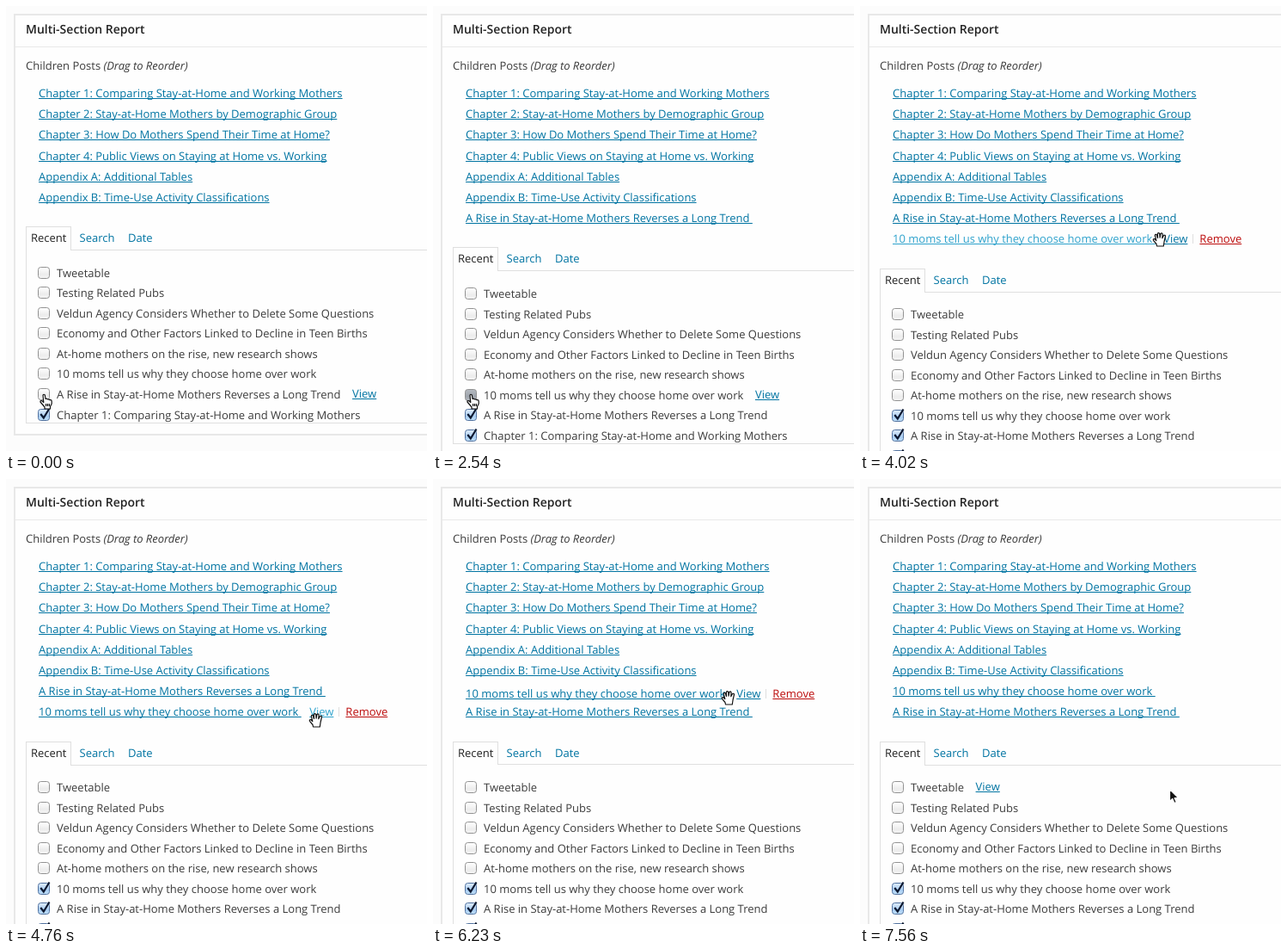
Recreate the animation shown at these times as an HTML page with a canvas. Size 490x517 px, loop 8000 ms.

```html
<!DOCTYPE html>
<html lang="en">
<head>
<meta charset="utf-8">
<style>
  html, body { margin: 0; width: 100%; height: 100%; overflow: hidden; background: #fcfcfc; }
  canvas { display: block; }
</style>
</head>
<body>
<canvas id="stage" width="490" height="517"></canvas>
<script>
const ctx = document.getElementById('stage').getContext('2d');
const LOOP = 8000;
const INK = '#3c3c3c', LINK = '#0074a2', HOVER = '#2ea2cc', RED = '#bc0b0b', LINE = '#dfdfdf';

const chapters = [
  'Chapter 1: Comparing Stay-at-Home and Working Mothers',
  'Chapter 2: Stay-at-Home Mothers by Demographic Group',
  'Chapter 3: How Do Mothers Spend Their Time at Home?',
  'Chapter 4: Public Views on Staying at Home vs. Working',
  'Appendix A: Additional Tables',
  'Appendix B: Time-Use Activity Classifications'
];
const RISE = 'A Rise in Stay-at-Home Mothers Reverses a Long Trend';
const MOMS = '10 moms tell us why they choose home over work';
const recent = [
  'Tweetable',
  'Testing Related Pubs',
  'Veldun Agency Considers Whether to Delete Some Questions',
  'Economy and Other Factors Linked to Decline in Teen Births',
  'At-home mothers on the rise, new research shows',
  MOMS, RISE, chapters[0]
];

// Cursor shapes with their offset from the pointer position
const cursors = {
  point: { dx: -7, dy: -1.5, fill: '#fff', edge: '#111',
    body: 'M4 1.5Q5 0 6.3 1.5L7 6Q8.5 5 9.3 6.5Q11 5.8 11.8 7.2Q14 6.6 14.2 9V11.5L12.5 15V17.5H6V15.5L1 9.5Q.5 7.5 3 8.3L4.8 10Z',
    detail: 'M7.6 11.5v3M9.5 11.5v3M11.4 11.5v3' },
  open: { dx: -8.5, dy: -8.5, fill: '#fff', edge: '#111',
    body: 'M5 16.5L4.5 14L1 9.8Q.3 8 2.2 8L4.3 10L2.8 4.2Q2.8 2.3 4.6 3L6 7L5.9 2Q6.8 .2 8.2 1.8L8.6 6.6L9.4 2Q10.8 .6 11.6 2.3L11.3 7.2L13 4Q14.8 3.2 15 5L13.6 11L12.8 16.5Z' },
  arrow: { dx: 0, dy: 0, fill: '#111', edge: '#fff',
    body: 'M0 0V14L3.2 11L5.4 16L7.8 15L5.6 10.2H10Z' }
};
for (const c of Object.values(cursors)) {
  c.body = new Path2D(c.body);
  c.detail = new Path2D(c.detail);
}

// Pointer track: time, shape, x, y (held until the next entry)
const track = [
  [0, 'point', 46, 452], [3580, 'arrow', 105, 445], [3730, 'arrow', 230, 380],
  [3880, 'arrow', 318, 300], [4020, 'open', 349, 271], [4170, 'open', 357, 272],
  [4320, 'open', 365, 273], [4470, 'open', 371, 274], [4610, 'open', 373, 275],
  [4760, 'open', 361, 280], [4910, 'open', 346, 275], [5350, 'open', 344, 273],
  [5800, 'open', 344, 267], [5940, 'open', 344, 264], [6090, 'open', 344, 259],
  [6230, 'open', 344, 254], [6380, 'open', 344, 249], [6520, 'open', 344, 245],
  [6670, 'open', 344, 242], [6820, 'open', 344, 243], [7120, 'open', 344, 244],
  [7270, 'open', 347, 270], [7410, 'arrow', 356, 325], [7560, 'arrow', 360.5, 360.5]
];

// Draws text around a vertical centre and returns its right end
function text(str, x, cy, color = INK, font = '13px') {
  ctx.font = `${font} "Open Sans", sans-serif`;
  ctx.fillStyle = color;
  ctx.fillText(str, x, cy + 5);
  return x + ctx.measureText(str).width;
}

function link(str, x, cy, color = LINK) {
  const end = text(str, x, cy, color);
  ctx.fillRect(x, cy + 6, end - x, 1);
  return end;
}

function rect(color, x, y, w, h) {
  ctx.fillStyle = color;
  ctx.fillRect(x, y, w, h);
}

function checkbox(cy, checked, pressed) {
  const shade = ctx.createLinearGradient(0, cy - 6, 0, cy + 7);
  const [top, mid, low] = checked ? ['#dcebfa', '#a9cdf2', '#c4e4fb']
    : pressed ? ['#b4b9c0', '#9ea4ac', '#b9bec5'] : ['#fff', '#ececec', '#f6f6f6'];
  shade.addColorStop(0, top);
  shade.addColorStop(.6, mid);
  shade.addColorStop(1, low);
  ctx.beginPath();
  ctx.roundRect(37.5, cy - 6.5, 13, 13, 3);
  ctx.fillStyle = shade;
  ctx.fill();
  ctx.lineWidth = 1;
  ctx.strokeStyle = checked ? '#52729f' : '#929292';
  ctx.stroke();
  if (checked) {
    ctx.lineWidth = 2.2;
    ctx.strokeStyle = '#0c1830';
    ctx.stroke(new Path2D(`M40.3 ${cy - 1}L43.8 ${cy + 3.5}L50.5 ${cy - 7.5}`));
  }
}

function drawChildren(t, added, shape, x, y) {
  const dragging = t >= 5940 && t < 7120;
  const extra = t >= 6230 ? [MOMS, RISE] : [RISE, MOMS];
  const items = [...chapters, ...extra.slice(0, added).map(s => s + ' ')];
  const hovered = shape !== 'open' ? -1
    : dragging ? items.indexOf(MOMS + ' ') : Math.round((y - 101) / 24.2);
  items.forEach((item, i) => {
    const cy = dragging && i === hovered ? y - 5 : Math.round(101 + 24.2 * i);
    const lit = i === hovered && t >= 4020 && t < 4170;
    const end = link(item, 38, cy, lit ? HOVER : LINK);
    if (i !== hovered) return;
    const viewEnd = link('View', end + 9.5, cy, x > 354 ? HOVER : LINK);
    rect(LINE, Math.round(viewEnd + 6), cy - 5, 1, 11);
    link('Remove', viewEnd + 14, cy, RED);
  });
}

function drawRecent(t, added, y) {
  const shift = 24.25 * added;
  const top = Math.round(256 + shift);
  const line = top + 27 - (t >= 6230 && t < 7120 ? 1 : 0);
  const bottom = top + 228;
  rect(LINE, 23, top, 53, 1);
  rect(LINE, 23, top, 1, bottom - top);
  rect(LINE, 75, top, 1, line - top);
  rect(LINE, 75, line, 415, 1);
  rect(LINE, 23, bottom, 467, 1);
  text('Recent', 29, top + 13, '#222');
  text('Search', 85.5, top + 13, LINK);
  text('Date', 142, top + 13, LINK);

  const first = 309.72 + shift, pitch = 23.54;
  const hovered = Math.floor((y - first) / pitch + .5);
  const pressed = t >= 440 && t < 740 || t >= 2540 && t < 2680;
  recent.forEach((label, i) => {
    const cy = Math.round(first + pitch * i);
    checkbox(cy, i >= 7 - added, pressed && i === 6 - added);
    const end = text(label, 59, cy);
    if (i === hovered) link('View', end + 13.6, cy - 1);
  });
}

function drawCursor(shape, x, y) {
  const c = cursors[shape];
  ctx.save();
  ctx.translate(x + c.dx, y + c.dy);
  ctx.lineWidth = 1.2;
  ctx.lineJoin = 'round';
  ctx.fillStyle = c.fill;
  ctx.strokeStyle = c.edge;
  ctx.fill(c.body);
  ctx.stroke(c.body);
  ctx.stroke(c.detail);
  ctx.restore();
}

function draw(t) {
  const added = t < 740 ? 0 : t < 2680 ? 1 : 2;
  const [, shape, x, y] = track.findLast(k => k[0] <= t);
  ctx.textRendering = 'geometricPrecision';
  rect('#fcfcfc', 0, 0, 490, 517);
  rect('#fefefe', 10, 10, 490, 488 + 24 * added);
  ctx.lineWidth = 2;
  ctx.strokeStyle = '#e8e8e8';
  ctx.strokeRect(10, 10, 600, 488 + 24 * added);
  rect('#e9e9e9', 11, 47, 479, 1);
  text('Multi-Section Report', 23, 27, '#222', '600 14px');
  const end = text('Children Posts ', 23, 69);
  text('(Drag to Reorder)', end, 69, INK, 'italic 13px');
  drawChildren(t, added, shape, x, y);
  drawRecent(t, added, y);
  drawCursor(shape, x, y);
}

const start = performance.now();
function tick() {
  draw((performance.now() - start) % LOOP);
  requestAnimationFrame(tick);
}
tick();
</script>
</body>
</html>
```
